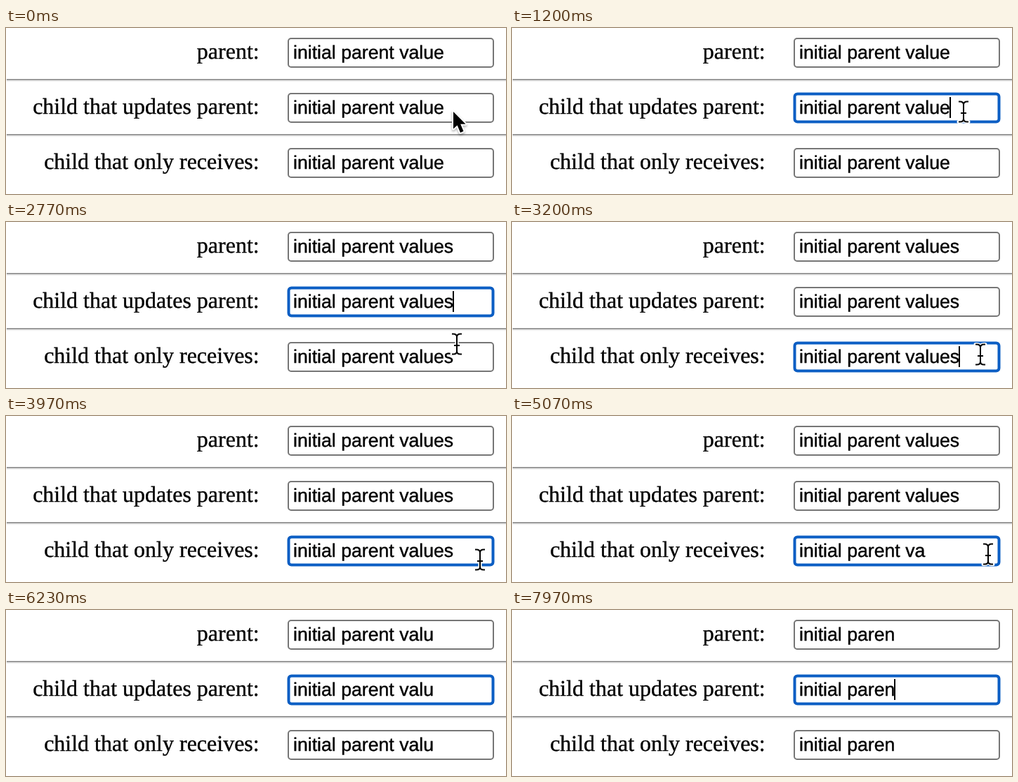
Recreate the animation shown at these times as an HTML page. Size 712 by 238 pixels, loop 8000 ms.

```html
<!DOCTYPE html>
<html lang="en">
<head>
<meta charset="utf-8">
<title>Parent and child inputs</title>
<style>
html, body { margin: 0; width: 100%; height: 100%; overflow: hidden; background: #fff; }
svg { display: block; width: 712px; height: 238px; }
text { white-space: pre; font-kerning: none; text-rendering: geometricPrecision; stroke: #000; stroke-width: .4; }
.label { font: 32px "Liberation Serif", "Times New Roman", serif; text-anchor: end; }
.value { font: 26.667px "Liberation Sans", Arial, sans-serif; }
.box { fill: #fff; stroke: #767676; stroke-width: 2; }
.ring { fill: none; stroke: #0b5ec4; stroke-width: 4; }
.arrow { stroke: #fff; stroke-width: 4; stroke-linejoin: round; paint-order: stroke;
  filter: drop-shadow(0 2px 1.5px rgba(0, 0, 0, .3)); }
.beam path { fill: none; stroke: #fff; stroke-width: 5; stroke-linecap: round; }
.beam path + path { stroke: #000; stroke-width: 2; stroke-linecap: butt; }
</style>
</head>
<body>
<svg viewBox="0 0 712 238">
  <g id="form"></g>
  <g id="mouse">
    <path class="arrow" d="M0 0V24.5L5.6 19.5L10 30L14.5 28L10.2 17.8H17.5Z"/>
    <g class="beam"></g>
  </g>
</svg>
<script>
const LOOP = 8000, PITCH = 79, BLINK = 500, TEXT_X = 409;
const FULL = 'initial parent values';
const labels = ['parent:', 'child that updates parent:', 'child that only receives:'];

// pointer way points: time, x, y
const way = [
  [70, 637, 120], [600, 643, 120], [2530, 643, 120], [2770, 642, 175], [3200, 667, 190],
  [3630, 675, 206], [5030, 675, 206], [5250, 690, 164], [5470, 683, 120]
];

const NS = 'http://www.w3.org/2000/svg';
function add(parent, tag, attrs, text = '') {
  const el = document.createElementNS(NS, tag);
  for (const key in attrs) el.setAttribute(key, attrs[key]);
  el.textContent = text;
  return parent.appendChild(el);
}
const show = (el, on) => el.setAttribute('visibility', on ? 'visible' : 'hidden');
const clamp = (v, lo, hi) => Math.min(hi, Math.max(lo, v));
const within = (t, from, to) => t >= from && t < to;

const mouse = document.getElementById('mouse');
const [arrow, beam] = mouse.children;
const beamShape = 'M-7 -14.5H-5Q0 -14.5 0 -10V10Q0 14.5 -5 14.5H-7M7 -14.5H5Q0 -14.5 0 -10M0 10Q0 14.5 5 14.5H7M-4 2H4';
for (let i = 0; i < 2; i++) add(beam, 'path', { d: beamShape });

const rows = labels.map((label, i) => {
  const g = add(document.getElementById('form'), 'g', { transform: `translate(0 ${i * PITCH})` });
  if (i) {
    add(g, 'rect', { x: 1, y: -6, width: 711, height: 2, fill: '#9a9a9a' });
    add(g, 'rect', { x: 1, y: -4, width: 711, height: 2, fill: '#eee' });
  }
  add(g, 'text', { class: 'label', x: 360.7, y: 44 }, label);
  return {
    box: add(g, 'rect', { class: 'box', x: 402, y: 15, width: 292, height: 41, rx: 4 }),
    ring: add(g, 'rect', { class: 'ring', x: 402.5, y: 15.5, width: 291, height: 40, rx: 4 }),
    value: add(g, 'text', { class: 'value', x: TEXT_X, y: 44 }),
    caret: add(g, 'rect', { y: 20, width: 2, height: 30 })
  };
});

// key presses so far in a run of n, one every gap ms
const presses = (t, start, n = 1, gap = 168) => clamp(Math.floor((t - start) / gap) + 1, 0, n);

function lengths(t) {
  const shared = 20 + presses(t, 1600) - presses(t, 5970) - presses(t, 6230, 6) - presses(t, 7930);
  const own = within(t, 4000, 5970) ? shared - presses(t, 4010, 4, 163) : shared;
  return [shared, shared, own];
}

function focusAt(t) {
  if (t < 200) return { active: -1, since: 0 };
  if (t < 3200) return { active: 1, since: t < 1630 ? 200 : 1630 };
  return t < 5600 ? { active: 2, since: 3200 } : { active: 1, since: 5600 };
}

function pointer(t) {
  const i = clamp(way.findIndex(p => p[0] > t), 1, way.length - 1);
  const [t0, x0, y0] = way[i - 1], [t1, x1, y1] = way[i];
  const k = clamp((t - t0) / (t1 - t0), 0, 1);
  return [x0 + (x1 - x0) * k, y0 + (y1 - y0) * k];
}

function draw(t) {
  const counts = lengths(t);
  const { active, since } = focusAt(t);
  const caretOn = Math.floor((t - since) / BLINK) % 2 === 0;

  rows.forEach(({ ring, value, caret }, i) => {
    const text = FULL.slice(0, counts[i]);
    if (value.textContent !== text) value.textContent = text;
    show(ring, i === active);
    show(caret, i === active && caretOn);
    if (i === active) caret.setAttribute('x', Math.round(TEXT_X - 1 + value.getComputedTextLength()));
  });

  // typing hides the pointer until it moves again
  const visible = t < 1600 || within(t, 2530, 4000) || within(t, 5030, 5970);
  const [x, y] = pointer(t).map(Math.round);
  const overInput = (y - 14) % PITCH < 43 && t >= 70;
  show(arrow, visible && !overInput);
  show(beam, visible && overInput);
  mouse.setAttribute('transform', `translate(${x} ${y})`);
}

const began = performance.now();
function tick() {
  draw((performance.now() - began) % LOOP);
  requestAnimationFrame(tick);
}
draw(0);
requestAnimationFrame(tick);
</script>
</body>
</html>
```
